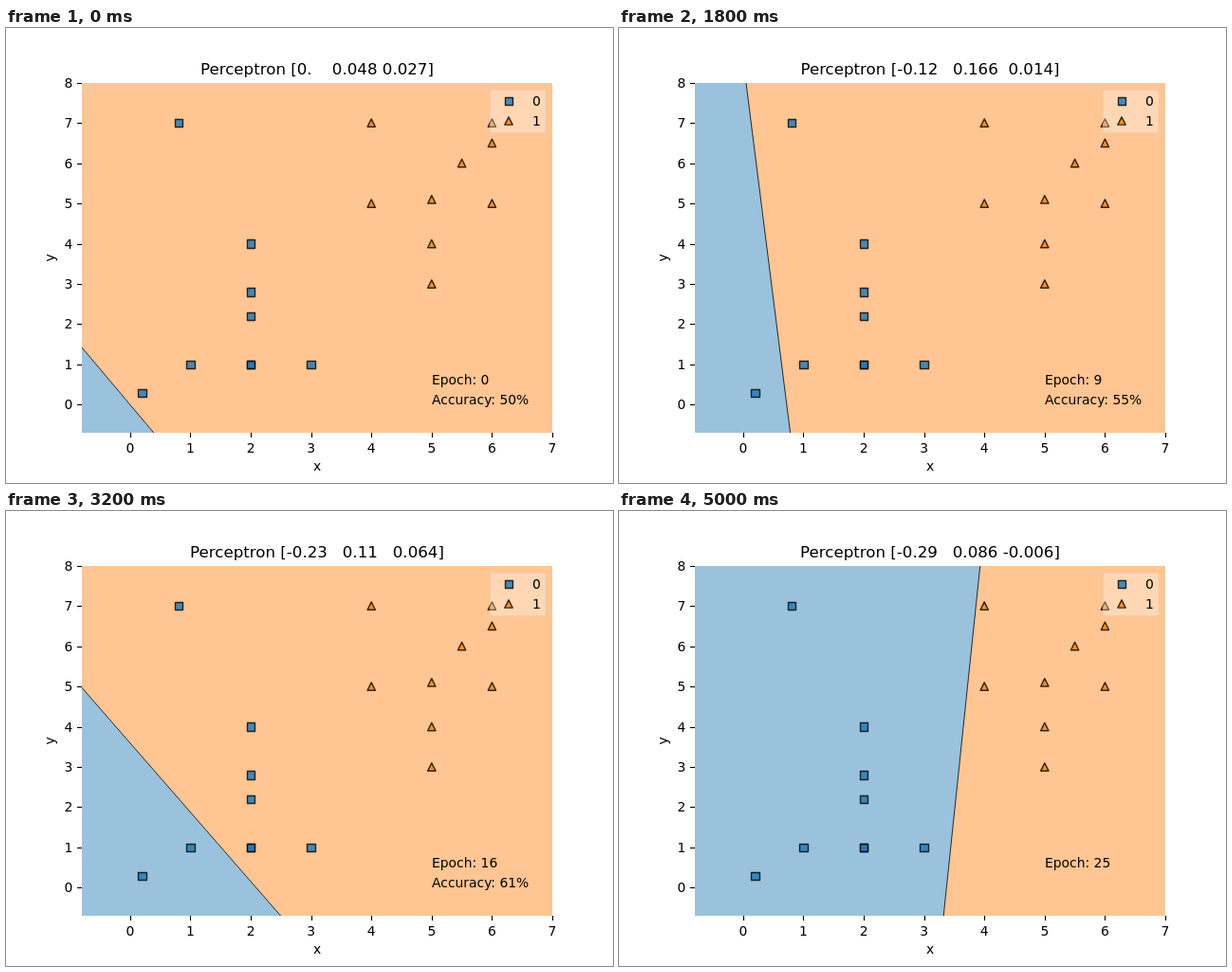
An HTML page with a canvas that plays this animation: 640 px wide and 480 px high, repeating every 5300 ms.

```html
<!DOCTYPE html>
<html lang="en">
<head>
<meta charset="utf-8">
<title>Perceptron training</title>
<style>
html, body { margin: 0; width: 100%; height: 100%; overflow: hidden; background: #fff; }
canvas { display: block; }
</style>
</head>
<body>
<canvas id="plot" width="640" height="480"></canvas>
<script>
const ctx = document.getElementById('plot').getContext('2d');

const STEP = 200, LOOP = 5300, LAST = 25;
const BLUE = '#1f77b4', ORANGE = '#ff7f0e';
const LEFT = 80, RIGHT = 576, TOP = 57.6, BOTTOM = 427.2;
const X_MIN = -0.8, X_MAX = 7, Y_MIN = -0.7, Y_MAX = 8;

// Training samples, in the order the learner visits them
const classes = [
  [[0.2, 0.3], [0.8, 7], [1, 1], [2, 1], [2, 1], [3, 1], [2, 2.2], [2, 2.8], [2, 4]],
  [[5, 3], [5, 4], [4, 5], [5, 5.1], [6, 5], [4, 7], [5.5, 6], [6, 6.5], [6, 7]]
];
const samples = classes.flatMap((points, label) => points.map(([x, y]) => ({
  label,
  input: [10, Math.round(x * 10), Math.round(y * 10)]
})));

const predict = (w, input) => w.reduce((sum, v, i) => sum + v * input[i], 0) >= 0 ? 1 : 0;

// Weights are whole thousandths, which makes the learning rate 0.01
function train() {
  const w = [0, 0, 0];
  const epochs = [];
  for (let e = 0; e <= LAST; e++) {
    for (const { input, label } of samples) {
      const error = label - predict(w, input);
      input.forEach((v, i) => { w[i] += error * v; });
    }
    const hits = samples.filter(s => predict(w, s.input) === s.label).length;
    epochs.push({ w: w.slice(), accuracy: Math.floor(100 * hits / samples.length) });
  }
  return epochs;
}

const epochs = train();

// Align numbers on the decimal point, as in an array printout
function formatArray(w) {
  const parts = w.map(v => {
    const [whole, fraction = ''] = String(v / 1000).split('.');
    return { whole, fraction };
  });
  const widest = key => Math.max(...parts.map(p => p[key].length));
  const wholeWidth = widest('whole'), fractionWidth = widest('fraction');
  return '[' + parts.map(p =>
    p.whole.padStart(wholeWidth) + '.' + p.fraction.padEnd(fractionWidth)).join(' ') + ']';
}

const px = x => LEFT + (x - X_MIN) / (X_MAX - X_MIN) * (RIGHT - LEFT);
const py = y => BOTTOM - (y - Y_MIN) / (Y_MAX - Y_MIN) * (BOTTOM - TOP);
const snap = v => Math.floor(v + 0.5) + 0.5;

function text(str, x, y, align = 'left', size = 13.89) {
  ctx.font = size + 'px "DejaVu Sans", sans-serif';
  ctx.textAlign = align;
  ctx.fillStyle = '#000';
  ctx.fillText(str, x, y);
}

function line(x1, y1, x2, y2, width) {
  ctx.beginPath();
  ctx.moveTo(x1, y1);
  ctx.lineTo(x2, y2);
  ctx.strokeStyle = '#000';
  ctx.lineWidth = width;
  ctx.stroke();
}

function marker(label, x, y) {
  const r = 4.167;
  ctx.beginPath();
  if (label === 0) {
    const x0 = snap(x - r), y0 = snap(y - r);
    ctx.rect(x0, y0, snap(x + r) - x0, snap(y + r) - y0);
  } else {
    ctx.moveTo(x, y - r);
    ctx.lineTo(x - r, y + r);
    ctx.lineTo(x + r, y + r);
    ctx.closePath();
  }
  ctx.globalAlpha = 0.8;
  ctx.fillStyle = label === 0 ? BLUE : ORANGE;
  ctx.fill();
  ctx.strokeStyle = '#000';
  ctx.lineWidth = 1.39;
  ctx.lineJoin = 'round';
  ctx.stroke();
  ctx.globalAlpha = 1;
}

function drawRegions([b, wx, wy]) {
  const edge = y => px(-(b + wy * y) / wx);
  const xTop = edge(Y_MAX), xBottom = edge(Y_MIN);
  ctx.save();
  ctx.beginPath();
  ctx.rect(LEFT, 58, RIGHT - LEFT, 369);
  ctx.clip();
  ctx.fillStyle = '#ffc593';
  ctx.fillRect(LEFT, 50, RIGHT - LEFT, 400);
  ctx.beginPath();
  ctx.moveTo(xTop, TOP);
  ctx.lineTo(xBottom, BOTTOM);
  ctx.lineTo(-900, BOTTOM);
  ctx.lineTo(-900, TOP);
  ctx.fillStyle = '#9ac2dd';
  ctx.fill();
  line(xTop, TOP, xBottom, BOTTOM, 0.8);
  ctx.restore();
}

function drawAxes() {
  for (let v = 0; v <= 7; v++) {
    const x = snap(px(v));
    line(x, 427, x, 432, 1.11);
    text(v, px(v), 448, 'center');
  }
  for (let v = 0; v <= 8; v++) {
    const y = snap(py(v));
    line(75, y, 80, y, 1.11);
    text(v, 70.3, Math.round(py(v) + 5), 'right');
  }
  text('x', 328, 467, 'center');
  ctx.save();
  ctx.translate(51, 242.4);
  ctx.rotate(-Math.PI / 2);
  text('y', 0, 0, 'center');
  ctx.restore();
}

function drawLegend() {
  ctx.beginPath();
  ctx.roundRect(510.5, 65.5, 58.5, 45, 2.8);
  ctx.globalAlpha = 0.3;
  ctx.fillStyle = '#fff';
  ctx.fill();
  ctx.strokeStyle = '#ccc';
  ctx.lineWidth = 1.39;
  ctx.stroke();
  ctx.globalAlpha = 1;
  [77, 98].forEach((y, label) => {
    marker(label, 530, y);
    text(label, 555, y + 5);
  });
}

function draw(epoch) {
  const { w, accuracy } = epochs[epoch];
  ctx.fillStyle = '#fff';
  ctx.fillRect(0, 0, 640, 480);
  drawRegions(w);
  drawAxes();
  classes.forEach((points, label) => {
    for (const [x, y] of points) marker(label, px(x), py(y));
  });
  text('Perceptron ' + formatArray(w), 328, 49, 'center', 16.67);
  text('Epoch: ' + epoch, 449, 376);
  if (epoch < LAST) text('Accuracy: ' + accuracy + '%', 449, 397);
  drawLegend();
}

let shown = -1;
function tick() {
  const epoch = Math.min(LAST, Math.floor(performance.now() % LOOP / STEP));
  if (epoch !== shown) {
    shown = epoch;
    draw(epoch);
  }
  requestAnimationFrame(tick);
}
tick();
</script>
</body>
</html>
```
